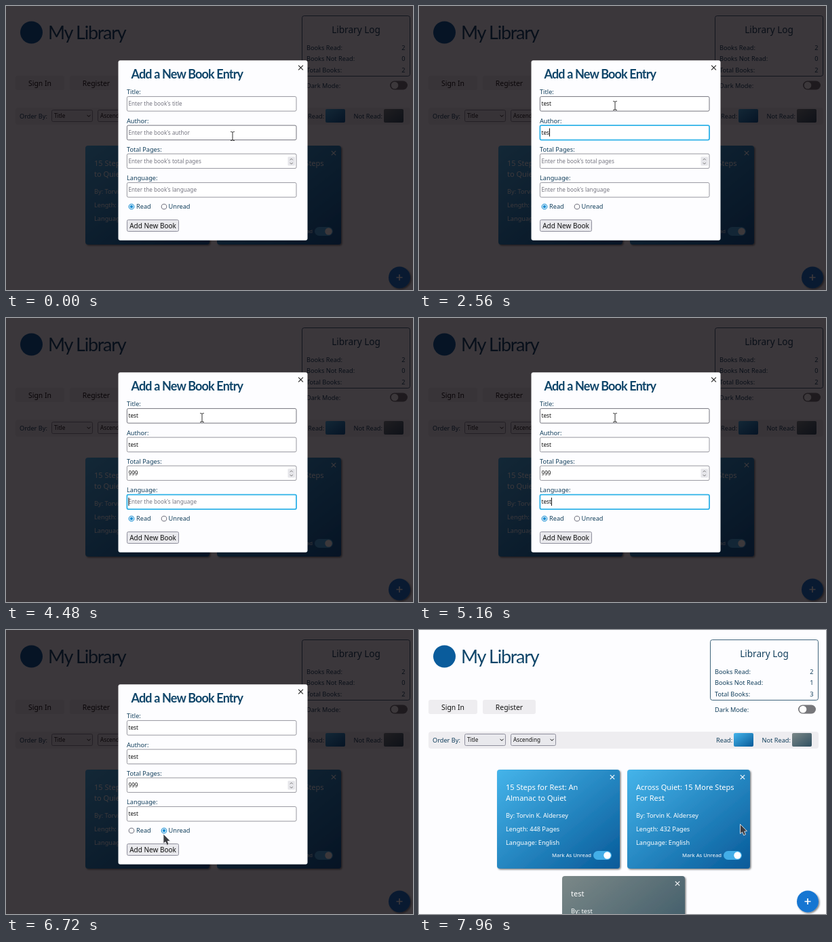
Write an HTML page that moves like this. It is 600 px wide and 419 px high and loops after 8 s.

```html
<!DOCTYPE html>
<html lang="en">
<head>
<meta charset="utf-8">
<title>My Library</title>
<style>
html, body { margin: 0; width: 100%; height: 100%; overflow: hidden; background: #fdfdff; }
svg { display: block; width: 100vw; height: 100vh; }
text { font-family: "Noto Sans", "Open Sans", sans-serif; font-size: 9.2px; fill: #123f5c; white-space: pre; }
.head { font-family: Lato, sans-serif; letter-spacing: -.047em; fill: #0f4569; }
.ink { fill: #111; }
.pale { fill: #fff; }
.hint { fill: #757580; }
.small { font-size: 8.2px; }
</style>
</head>
<body>
<svg id="stage" viewBox="0 0 600 419">
  <defs>
    <linearGradient id="read" x2="1" y2="1"><stop stop-color="#45b4ea"/><stop offset="1" stop-color="#075a99"/></linearGradient>
    <linearGradient id="unread" x2="1" y2="1"><stop stop-color="#7b8888"/><stop offset="1" stop-color="#2f4f60"/></linearGradient>
    <filter id="shadow" x="-10%" y="-10%" width="120%" height="125%"><feDropShadow dx="1.5" dy="1.5" stdDeviation="1.3" flood-opacity=".5"/></filter>
  </defs>
</svg>
<script>
const LOOP = 8000, CLOSE = 7240;
const NAVY = '#123f5c', BLUE = '#2fb2e8';
const stage = document.getElementById('stage');

const text = (x, y, s, cls = '', more = '') => `<text x="${x}" y="${y}" class="${cls}" ${more}>${s}</text>`;
const rect = (x, y, w, h, fill, r = 0, more = '') =>
  `<rect x="${x}" y="${y}" width="${w}" height="${h}" rx="${r}" fill="${fill}" ${more}/>`;
const line = (d, color, w = 1) => `<path d="${d}" fill="none" stroke="${color}" stroke-width="${w}"/>`;
const cross = (x, y, r, color) =>
  line(`M${x - r} ${y - r}l${2 * r} ${2 * r}m0 ${-2 * r}l${-2 * r} ${2 * r}`, color, 1.1);
const size = n => `style="font-size:${n}px"`;

function select(x, w, label) {
  return rect(x + .5, 153.5, w - 1, 17, '#e9e9ed', 2, 'stroke="#8f8f9d"') +
    text(x + 4, 165.3, label, 'ink small') +
    line(`M${x + w - 8.5} 160.8l2.5 2.5 2.5 -2.5`, '#111');
}

function card(x, y, w, fill, title, facts) {
  const body = y + 39.2 + title.length * 16;
  return rect(x, y, w, 146, `url(#${fill})`, 4, 'filter="url(#shadow)"') +
    cross(x + w - 11, y + 11, 3.2, '#fff') +
    title.map((s, i) => text(x + 13, y + 30 + i * 16, s, 'pale', size(11) + ' font-weight="500"')).join('') +
    facts.map((s, i) => text(x + 13, body + i * 20, s, 'pale')).join('') +
    text(x + w - 42, y + 129.3, 'Mark As Unread', 'pale', size(7.7) + ' text-anchor="end"') +
    rect(x + w - 39, y + 120, 27, 13, '#43aee8', 6.5) +
    `<circle cx="${x + w - 18.5}" cy="${y + 126.5}" r="5.2" fill="#fff"/>`;
}

// dx: extra page width while the scrollbar is hidden
function page(dx, counts, cards) {
  const log = ['Books Read:', 'Books Not Read:', 'Total Books:'];
  return rect(0, 0, 600, 419, '#fdfdff') +
    '<circle cx="37.5" cy="39" r="16.5" fill="#0a5c9c"/>' +
    text(62, 49, 'My Library', 'head', size(27)) +
    rect(14, 103, 72, 21, '#eeedf0', 3) + text(50, 117.5, 'Sign In', 'ink', size(10.4) + ' text-anchor="middle"') +
    rect(94, 103, 78, 21, '#eeedf0', 3) + text(133, 117.5, 'Register', 'ink', size(10.4) + ' text-anchor="middle"') +
    rect(14, 150, 575 + dx, 25, '#eeedf0', 4) + text(20, 165.8, 'Order By:') +
    select(67, 61, 'Title') + select(135, 67, 'Ascending') +
    `<g transform="translate(${dx})">` +
    rect(429.5, 14.5, 159, 89, '#fdfdff', 3, `stroke="${NAVY}" stroke-width=".8"`) +
    text(509, 39.5, 'Library Log', '', size(13.6) + ' text-anchor="middle"') +
    log.map((s, i) => text(436, 64.5 + i * 16.5, s) +
      text(581.5, 64.5 + i * 16.5, counts[i], '', 'text-anchor="end"')).join('') +
    text(436, 120.7, 'Dark Mode:') + rect(559, 110.5, 26, 13, '#77777b', 6.5) +
    '<circle cx="566" cy="117" r="5.3" fill="#fff"/>' +
    text(438, 165.8, 'Read:') + rect(464, 152, 29, 20, 'url(#read)', 2) +
    text(505.5, 165.8, 'Not Read:') + rect(550, 152, 29, 20, 'url(#unread)', 2) +
    '</g>' + cards +
    `<g transform="translate(${dx})"><circle cx="573" cy="400.5" r="16" fill="#1976d2" filter="url(#shadow)"/>` +
    line('M568.5 400.5h9m-4.5 -4.5v9', '#fff', 1.7) + '</g>';
}

const facts = n => ['By: Torvin K. Aldersey', `Length: ${n} Pages`, 'Language: English'];
const second = ['Across Quiet: 15 More Steps', 'For Rest'];
const behind = page(7, [2, 0, 2],
  card(117, 206, 183, 'read', ['15 Steps for Rest: An Almanac', 'to Quiet'], facts(448)) +
  card(311, 206, 183, 'read', second, facts(432)));
const after = page(0, [2, 1, 3],
  card(115, 206, 181, 'read', ['15 Steps for Rest: An', 'Almanac to Quiet'], facts(448)) +
  card(307, 206, 181, 'read', second, facts(432)) +
  card(211, 363, 181, 'unread', ['test'], ['By: test']));

// focus: when the field is entered; keys: when each character lands
const fields = [
  { y: 133, label: 'Title:', hint: 'title', value: 'test', focus: 800, keys: [1140, 1260, 1400, 1520] },
  { y: 175.5, label: 'Author:', hint: 'author', value: 'test', focus: 1960, keys: [2240, 2360, 2520, 2680] },
  { y: 217.5, label: 'Total Pages:', hint: 'total pages', value: '999', focus: 3040, keys: [3560, 3720, 3880] },
  { y: 260, label: 'Language:', hint: 'language', value: 'test', focus: 4360, keys: [4680, 4840, 4960, 5080] }
];
const UNREAD = 6520;
fields.forEach((f, i) => f.blur = i < 3 ? fields[i + 1].focus : UNREAD);

const form = rect(165.5, 80.2, 279, 265.5, '#fdfdff', 3) +
  text(184.5, 106.5, 'Add a New Book Entry', 'head', size(18) + ' font-weight="700"') +
  cross(434.5, 91, 3.4, '#222') +
  fields.map((f, i) => text(178, f.y - 3, f.label) +
    `<g id="field${i}">` + rect(178.4, f.y + .6, 249.6, 21.5, '#fff', 2, 'class="box"') +
    text(180.5, f.y + 14, '', 'small') + rect(0, f.y + 5, 1, 12, '#111', 0, 'class="caret"') + '</g>').join('') +
  rect(415.5, 222.5, 10.5, 13, '#e6e6ea', 1) + line('M418.7 227.2l2 -2 2 2m-4 4l2 2 2 -2', '#777') +
  '<g id="radios"></g>' + text(192, 299.3, 'Read') + text(239.5, 299.3, 'Unread') +
  rect(178.5, 315.5, 76, 17, '#e9e9ed', 2, 'id="add" stroke="#8f8f9d"') +
  text(216.5, 327.7, 'Add New Book', 'ink', size(10) + ' text-anchor="middle"');

stage.insertAdjacentHTML('beforeend',
  `<g id="open">${behind}${rect(0, 0, 600, 419, '#060104', 0, 'opacity=".78"')}${form}</g>` +
  `<g id="done">${after}</g>` +
  `<g id="beam">${line('M-3 -6.5q3 0 3 1.5v10q0 1.5 -3 1.5m6 -13q-3 0 -3 1.5m0 10q0 1.5 3 1.5', '#444', 1.1)}</g>` +
  '<path id="arrow" d="M0 0V14L3.2 11.6 5.2 16.4 8 15.2 6.2 10.6 10 10.2Z" fill="#3c3c40" stroke="#e4e4e8" stroke-width=".9" stroke-linejoin="round"/>');

const $ = id => document.getElementById(id);
const show = (el, on) => el.setAttribute('display', on ? 'inline' : 'none');
const set = (el, attrs) => { for (const k in attrs) el.setAttribute(k, attrs[k]); };
const inside = (p, x, y, w, h) => p[0] >= x && p[0] <= x + w && p[1] >= y && p[1] <= y + h;

// start, end, target of each pointer move
const moves = [
  [40, 720, 289, 147], [5200, 5700, 249, 323], [5960, 6440, 232, 301],
  [6800, 7120, 226, 322], [7360, 7940, 473.5, 286.5]
];
function pointer(t) {
  let p = [334, 192];
  for (const [a, b, x, y] of moves) {
    const u = Math.min(1, Math.max(0, (t - a) / (b - a))), k = u * u * (3 - 2 * u);
    p = [p[0] + (x - p[0]) * k, p[1] + (y - p[1]) * k];
  }
  return p;
}

function drawField(f, i, t, p) {
  const [box, label, caret] = $('field' + i).children;
  const typed = f.keys.filter(k => t >= k).length;
  const focused = t >= f.focus && t < f.blur;
  const hover = inside(p, 178, f.y, 250, 22);
  set(box, { stroke: focused ? BLUE : hover ? '#74747e' : '#97979f', 'stroke-width': focused ? 1.8 : 1 });
  label.textContent = typed ? f.value.slice(0, typed) : `Enter the book's ${f.hint}`;
  label.setAttribute('class', typed ? 'small ink' : 'small hint');
  const last = typed ? f.keys[typed - 1] : f.focus;
  show(caret, focused && (t - last) % 1000 < 500);
  caret.setAttribute('x', 180.5 + (typed ? label.getComputedTextLength() : 0));
  return hover;
}

function radio(x, on, hover) {
  const color = on ? '#1a8fd4' : hover ? '#4a4a52' : '#777784';
  return `<circle cx="${x}" cy="296" r="3.8" fill="#fff" stroke="${color}" stroke-width="1.1"/>` +
    (on ? `<circle cx="${x}" cy="296" r="2.3" fill="${color}"/>` : '');
}

function render(t) {
  const open = t < CLOSE, p = pointer(t);
  show($('open'), open);
  show($('done'), !open);
  let overField = false;
  if (open) {
    fields.forEach((f, i) => { overField = drawField(f, i, t, p) || overField; });
    const unread = t >= UNREAD;
    $('radios').innerHTML = radio(185, !unread, false) + radio(233, unread, inside(p, 228, 291, 42, 11));
    const over = inside(p, 178, 315, 77, 18);
    set($('add'), { fill: over ? '#d0d0d7' : '#e9e9ed', stroke: over ? '#676774' : '#8f8f9d' });
  }
  show($('beam'), overField);
  show($('arrow'), !overField);
  for (const id of ['beam', 'arrow']) $(id).setAttribute('transform', `translate(${p[0]} ${p[1]})`);
}

const start = performance.now();
function tick() {
  render((performance.now() - start) % LOOP);
  requestAnimationFrame(tick);
}
render(0);
tick();
</script>
</body>
</html>
```
